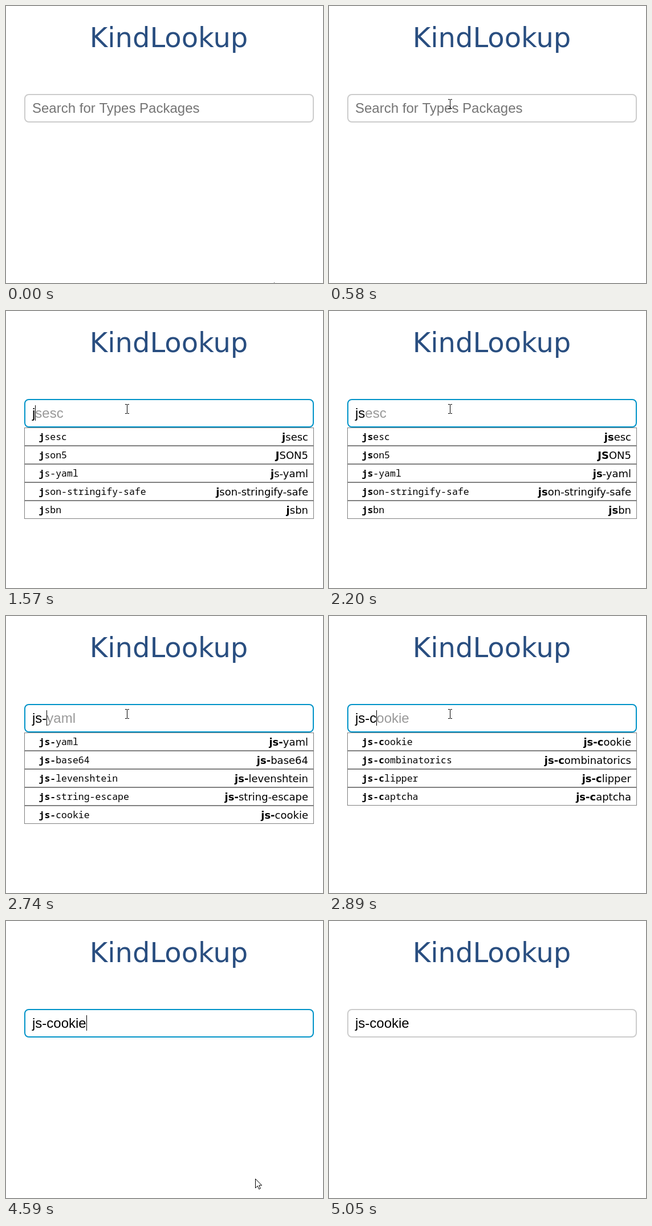
An HTML page with a canvas for the animation above (5930 ms loop, 556 by 485 pixels).

```html
<!DOCTYPE html>
<html lang="en">
<head>
<meta charset="utf-8">
<title>KindLookup</title>
<style>
  html, body { margin: 0; width: 100%; height: 100%; overflow: hidden; background: #fff; }
  canvas { display: block; width: 556px; height: 485px; }
</style>
</head>
<body>
<canvas id="stage"></canvas>
<script>
const W = 556, H = 485, LOOP = 5930;
const SANS = '"DejaVu Sans", Verdana, sans-serif';
const MONO = '"Noto Sans Mono", Consolas, monospace';
const INPUT_FONT = '24px "Liberation Sans", Arial, sans-serif';
const FIELD = { x: 32, y: 154, w: 508, h: 50 };
const ROW_H = 32;

const canvas = document.getElementById('stage');
const ctx = canvas.getContext('2d', { alpha: false });
const dpr = window.devicePixelRatio || 1;
canvas.width = W * dpr;
canvas.height = H * dpr;

const lists = {
  '': [],
  js: ['jsesc', 'json5', 'js-yaml', 'json-stringify-safe', 'jsbn'],
  'js-': ['js-yaml', 'js-base64', 'js-levenshtein', 'js-string-escape', 'js-cookie'],
  'js-c': ['js-cookie', 'js-combinatorics', 'js-clipper', 'js-captcha']
};
const titles = { json5: 'JSON5' };

// Each entry only names what changes from the one before.
const steps = [
  { t: 0, text: '', hint: '', list: '', match: 0, focus: false, caret: false },
  { t: 730, focus: true, caret: true },
  { t: 1190, caret: false },
  { t: 1570, text: 'j', hint: 'jsesc', list: 'js', match: 1, caret: true },
  { t: 1650, text: 'js', match: 2 },
  { t: 2200, caret: false },
  { t: 2660, text: 'js-', hint: 'js-yaml', caret: true },
  { t: 2740, list: 'js-', match: 3 },
  { t: 2890, text: 'js-c', hint: 'js-cookie', list: 'js-c', match: 4 },
  { t: 3440, caret: false },
  { t: 3980, caret: true },
  { t: 4360, text: 'js-cookie', hint: '', list: '' },
  { t: 4900, caret: false },
  { t: 5050, focus: false }
];

// Pointer positions: time, x, y
const pointer = [
  [0, 470, 484], [70, 448, 436], [150, 390, 345], [220, 318, 250],
  [290, 246, 150], [360, 200, 112], [440, 183, 97], [510, 196, 130],
  [580, 212, 171], [3900, 212, 179], [3980, 213, 198], [4060, 213, 215],
  [4360, 222, 226], [4440, 275, 280], [4510, 365, 375],
  [4590, 437, 451], [4670, 464, 480], [4750, 480, 520]
];

const arrow = new Path2D('M.5.5V16.5L4.2 12.9 6.7 18.5 9.3 17.4 6.8 11.9H11.7Z');
const hand = new Path2D('M-1.5 14V2Q-1.5.5 0 .5T1.5 2V8Q5 6.5 5 9Q8 7.5 8 10' +
  'Q10.5 9 10.5 11V16Q10.5 19 8.5 20V22.5H-.5V20L-5.5 14Q-5.5 11.5-3.5 11.5L-1.5 13.5Z' +
  'M1.5 8V12M5 9V12M8 10V12');
const beam = new Path2D('M-3 -7.5H0M1 -7.5H4M.5 -7V8M-3 8.5H0M1 8.5H4');

function stateAt(t) {
  return Object.assign({}, ...steps.filter(s => s.t <= t));
}

function write(str, x, y, font, color) {
  ctx.font = font;
  ctx.fillStyle = color;
  ctx.fillText(str, x, y);
  return ctx.measureText(str).width;
}

// Writes a name with its first n letters in bold.
function writeMatch(name, n, x, y, size, family, alignRight) {
  const head = name.slice(0, n), tail = name.slice(n);
  const bold = `bold ${size}px ${family}`, plain = `${size}px ${family}`;
  if (alignRight) {
    ctx.font = bold;
    x -= ctx.measureText(head).width;
    ctx.font = plain;
    x -= ctx.measureText(tail).width;
  }
  x += write(head, x, y, bold, '#000');
  write(tail, x, y, plain, '#000');
}

function drawField(s) {
  ctx.lineWidth = 2;
  ctx.strokeStyle = s.focus ? '#0093c8' : '#ccc';
  ctx.beginPath();
  ctx.roundRect(FIELD.x + 1, FIELD.y + 1, FIELD.w - 2, FIELD.h - 2, 7);
  ctx.stroke();

  if (s.text) {
    // The hint shows only past the typed part.
    const w = write(s.text, 46, 187, INPUT_FONT, '#000');
    write(s.hint.slice(s.text.length), 46 + w, 187, INPUT_FONT, '#999');
  } else {
    write('Search for Types Packages', 46, 187, INPUT_FONT, '#757575');
  }
  if (s.caret) {
    ctx.font = INPUT_FONT;
    const x = Math.round(46 + ctx.measureText(s.text).width);
    ctx.fillStyle = '#000';
    ctx.fillRect(x, s.text ? 165 : 166, 1, 27);
  }
}

function drawList(s) {
  ctx.lineWidth = 1;
  lists[s.list].forEach((name, i) => {
    const y = FIELD.y + FIELD.h + i * ROW_H;
    ctx.strokeStyle = '#808080';
    ctx.strokeRect(FIELD.x + 0.5, y + 0.5, FIELD.w - 1, ROW_H - 1);
    writeMatch(name, s.match, 57.5, y + 22, 16.5, MONO, false);
    writeMatch(titles[name] || name, s.match, 530, y + 23, 18, SANS, true);
  });
}

function drawPointer(t, s) {
  const [, x, y] = pointer.filter(p => p[0] <= t).pop();
  const inField = y >= FIELD.y && y < FIELD.y + FIELD.h;
  const overList = s.list && y >= FIELD.y + FIELD.h;
  ctx.save();
  ctx.translate(x, y);
  ctx.lineWidth = 1;
  ctx.strokeStyle = '#000';
  ctx.fillStyle = '#fff';
  if (inField) {
    ctx.stroke(beam);
  } else {
    const shape = overList ? hand : arrow;
    ctx.fill(shape);
    ctx.stroke(shape);
  }
  ctx.restore();
}

function draw(t) {
  const s = stateAt(t);
  ctx.setTransform(dpr, 0, 0, dpr, 0, 0);
  ctx.fillStyle = '#fff';
  ctx.fillRect(0, 0, W, H);
  ctx.textAlign = 'center';
  write('KindLookup', 285.5, 72, `48px ${SANS}`, '#294e80');
  ctx.textAlign = 'left';
  drawField(s);
  drawList(s);
  drawPointer(t, s);
}

const start = performance.now();
function tick() {
  draw((performance.now() - start) % LOOP);
  requestAnimationFrame(tick);
}
tick();
</script>
</body>
</html>
```
